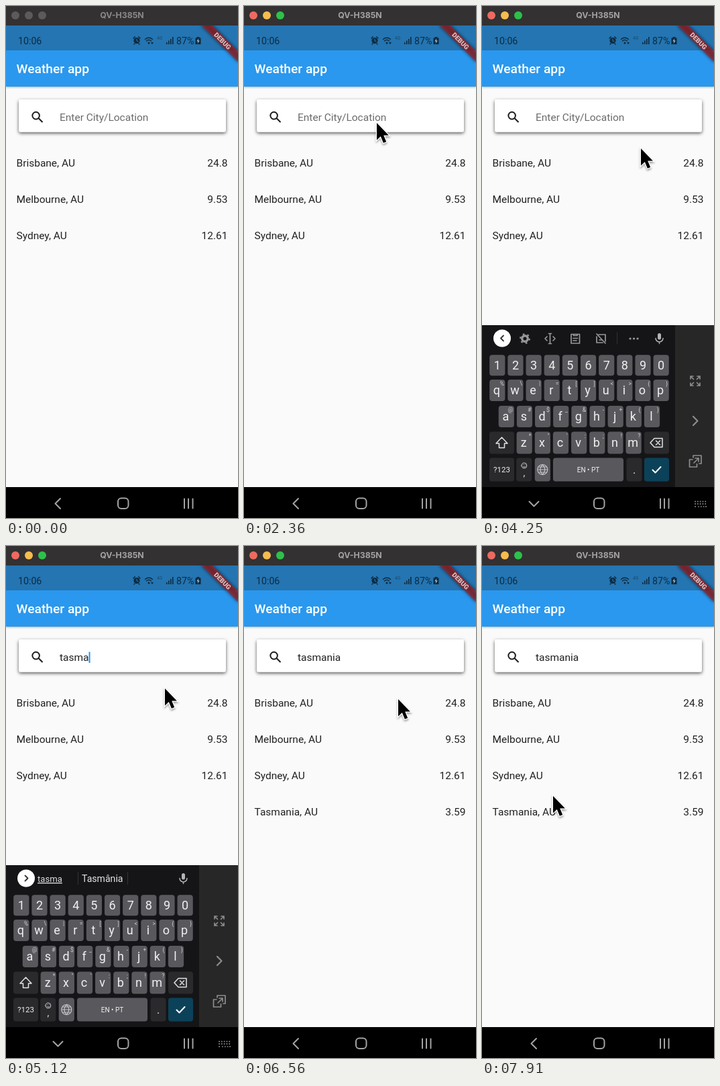
Animation, 346 px wide and 762 px high, one loop 8000 ms. Source, as an HTML page:

```html
<!DOCTYPE html>
<html lang="en">
<head>
<meta charset="utf-8">
<title>Weather app</title>
<style>
  html, body { margin: 0; width: 100%; height: 100%; overflow: hidden; background: #000; }
  svg { display: block; width: 346px; height: 762px; font-family: Roboto, sans-serif; }
  .line { fill: none; stroke-linecap: round; stroke-linejoin: round; }
</style>
</head>
<body>
<svg id="stage" viewBox="0 0 346 762" xmlns="http://www.w3.org/2000/svg">
  <defs>
    <clipPath id="screen"><rect y="29" width="346" height="733"/></clipPath>
    <filter id="soft" x="-30%" y="-100%" width="160%" height="300%"><feGaussianBlur stdDeviation="2.5"/></filter>
    <filter id="card" x="-10%" y="-30%" width="120%" height="170%"><feDropShadow dx="0" dy="2" stdDeviation="2.8" flood-opacity=".65"/></filter>
    <filter id="bar" x="-5%" y="-10%" width="110%" height="130%"><feDropShadow dx="0" dy="1" stdDeviation="1.4" flood-opacity=".3"/></filter>
    <filter id="drop" x="-50%" y="-30%" width="200%" height="170%"><feDropShadow dx="0" dy="2" stdDeviation="1.5" flood-opacity=".4"/></filter>
  </defs>

  <rect y="29" width="346" height="687" fill="#fafafa"/>
  <g id="list" font-size="15.5" fill="#212121"></g>
  <path id="spinner" class="line" style="stroke-linecap:square" stroke="#2196f3" stroke-width="3.8"/>

  <rect x="19" y="139" width="309" height="48.5" rx="3" fill="#fff" filter="url(#card)"/>
  <g class="line" transform="translate(35.5 154) scale(.96)" stroke="#1c1c1c" stroke-width="2.1" style="stroke-linecap:butt">
    <circle cx="9.5" cy="9.5" r="5.5"/><path d="M13.6 13.6L19.8 19.8"/>
  </g>
  <text id="query" x="80" y="171" font-size="15.5"></text>
  <rect id="caret" y="157.5" width="2" height="16.5" fill="#2196f3"/>

  <rect y="60" width="346" height="60" fill="#2b98ee" filter="url(#bar)"/>
  <rect y="29" width="346" height="37" fill="#2475b2"/>
  <text x="15.5" y="100" font-size="19.25" font-weight="500" fill="#fff">Weather app</text>

  <g fill="#0d2b42">
    <text x="18" y="57" font-size="14.2">10:06</text>
    <text x="254" y="57" font-size="14.2">87%</text>
    <text x="225" y="50" font-size="6.5" opacity=".6">4G</text>
    <circle cx="195" cy="51.5" r="4.6"/>
    <path d="M282.5 47.5h2v-1.5h4v1.5h2v9.5h-8z"/>
    <path d="M287.3 48.2l-3 4.4h2.1l-.8 3.6 3.2-4.6h-2.1z" fill="#9cc4e2"/>
    <path d="M239 57v-3h1.6v3zM242 57v-5.5h1.6v5.5zM245 57v-8h1.6v8zM248 57v-11h1.6v11z"/>
    <g class="line" stroke="#0d2b42" stroke-width="1.5">
      <path d="M190 48l2.3-2.3M200 48l-2.3-2.3M192 56l-1 1M198 56l1 1M207.5 49.5q5.5-4.5 11 0M209.5 52q3.5-2.8 7 0"/>
      <path d="M195 49v2.8l2 1" stroke="#2475b2" stroke-width="1.1"/>
    </g>
    <circle cx="213" cy="55" r="1.5"/><path d="M216 54h4l-2 3z"/>
  </g>

  <g clip-path="url(#screen)">
    <g transform="translate(346 29) rotate(45) scale(.96)">
      <rect x="-40" y="28" width="80" height="12" opacity=".6" filter="url(#soft)"/>
      <rect x="-40" y="28" width="80" height="12" fill="#b71c1c" fill-opacity=".6"/>
      <text y="37.6" font-size="10.2" font-weight="900" text-anchor="middle" fill="#fff" opacity=".72">DEBUG</text>
    </g>
  </g>

  <rect y="716" width="346" height="46" fill="#000"/>
  <g id="keyboard">
    <rect y="475" width="346" height="241" fill="#151518"/>
    <rect x="288" y="475" width="58" height="241" fill="#272727"/>
    <g id="keys"></g>
    <circle cx="30" cy="494.5" r="13" fill="#fff"/>
    <path id="toggle" class="line" stroke="#333" stroke-width="1.8"/>
    <g id="tools" class="line" stroke="#98989b" stroke-width="1.7">
      <circle cx="64" cy="495" r="4.3" stroke-width="3.4"/>
      <circle cx="64" cy="495" r="6.8" stroke-width="2.2" stroke-dasharray="2.7 4.42" style="stroke-linecap:butt"/>
      <path d="M101.5 488v14M99.5 487.5h4M99.5 502.5h4M97 492l-3 3 3 3M106 492l3 3-3 3"/>
      <path d="M133 488.5h12.5v13.5h-12.5zM136.5 488.5h5.5v2h-5.5zM136 494.5h6.5M136 498h5"/>
      <path d="M174 489h10v10M171 492v9h9M171 488l13 14M175 497h3"/>
      <path d="M201.5 486v17" stroke="#303033" stroke-width="1"/>
      <path d="M221 495h.1M226.5 495h.1M232 495h.1" stroke-width="3.2"/>
    </g>
    <g id="hints" fill="#e4e4e6">
      <text id="typed" x="47" y="500" font-size="13.1" text-decoration="underline"></text>
      <text id="guess" x="113" y="500" font-size="14.1"></text>
      <path d="M107.5 485v19M181.5 485v19" stroke="#333336"/>
    </g>
    <rect x="262" y="487" width="5" height="9.5" rx="2.5" fill="#b4b4b6"/>
    <path class="line" stroke="#b4b4b6" stroke-width="1.5" d="M259 494.5a5.5 5.5 0 0 0 11 0M264.5 500v2.5"/>
    <g class="line" stroke="#8d8d8f" stroke-width="1.7">
      <path d="M311 555v-4h4M321 551h4v4M325 561v4h-4M315 565h-4v-4M311 551l4.5 4.5M325 551l-4.5 4.5M325 565l-4.5-4.5M311 565l4.5-4.5"/>
      <path d="M315 611l6.5 6.5-6.5 6.5" stroke-width="2.2"/>
      <path d="M314 675h-4.5v11h11v-4.5M315 672v-3h12v12h-3M316 680l7-7M318 673h5v5"/>
    </g>
  </g>

  <g class="line" stroke="#a3a3a3" stroke-width="2">
    <path id="back"/>
    <rect x="167" y="732.5" width="15.5" height="15.5" rx="5"/>
    <path d="M266 733.5v14M272 733.5v14M278.5 733.5v14"/>
    <path id="switch" stroke="#8a8a8a" stroke-width="1.9" stroke-dasharray=".1 3.7" d="M318 737.5h19M318 741h19M318 745h2M334 745h3M323 745.1h8"/>
  </g>

  <rect width="346" height="29" fill="#333132"/>
  <g id="lights"></g>
  <text id="title" x="173" y="18.3" font-family="Inter, sans-serif" font-size="12.3" font-weight="700" text-anchor="middle">QV-H385N</text>

  <path id="pointer" d="M0 0V25.5L5.8 20L9.9 29.7L14.2 27.9L10.2 18.6H17.9Z" fill="#000" stroke="#fff" stroke-width="2.4" paint-order="stroke" filter="url(#drop)"/>
</svg>
<script>
const LOOP = 8000;
const FOCUS = 1180, OPEN = 3650, SEARCH = 5980, RESULT = 6460;
const WORD = 'tasmania';
const STROKES = [4530, 4720, 4820, 5010, 5110, 5310, 5510, 5700];
const PATH = [
  [800, 324, 498], [1580, 225, 312], [1680, 221, 300], [1870, 206, 242], [2070, 206, 242],
  [2360, 198, 174], [3180, 198, 174], [3360, 161, 170], [3650, 161, 170], [3750, 168, 184],
  [4250, 237, 212], [6370, 237, 212], [6560, 230, 228], [7150, 158, 378], [7250, 152, 384], [7910, 106, 372]
];
const CITIES = [['Brisbane, AU', '24.8'], ['Melbourne, AU', '9.53'], ['Sydney, AU', '12.61'], ['Tasmania, AU', '3.59']];

const $ = id => document.getElementById(id);
const clamp = v => Math.max(0, Math.min(1, v));
const show = (el, on) => el.setAttribute('visibility', on ? 'inherit' : 'hidden');

function add(parent, tag, attrs, text) {
  const el = document.createElementNS('http://www.w3.org/2000/svg', tag);
  for (const k in attrs) el.setAttribute(k, attrs[k]);
  if (text) el.textContent = text;
  return parent.appendChild(el);
}

const rows = CITIES.map(([name, temp], i) => {
  const row = add($('list'), 'g', {});
  const y = 239 + 54 * i;
  add(row, 'text', { x: 15.5, y }, name);
  add(row, 'text', { x: 330.5, y, 'text-anchor': 'end' }, temp);
  return row;
});

const lights = [14, 34, 54].map(cx => add($('lights'), 'circle', { cx, cy: 14, r: 6 }));

// Keyboard
const keys = $('keys');
const KEY = '#59595d', DARK = '#2a2a2d';
function key(x, y, w, h, label, size = 18, fill = KEY, mark = '') {
  add(keys, 'rect', { x: x - w / 2, y: y - h / 2, width: w, height: h, rx: 4, fill });
  if (label) add(keys, 'text', { x: x - (mark ? 1 : 0), y: y + size * .35, 'font-size': size, fill: '#f0f0f0', 'text-anchor': 'middle' }, label);
  if (mark) add(keys, 'text', { x: x + w / 2 - 1.5, y: y - 7.5, 'font-size': 8.5, fill: '#d0d0d2', 'text-anchor': 'end' }, mark);
}
[
  ['1234567890', '', 22.8, 534.7, 31],
  ['qwertyuiop', '%\\|=[]<>{}', 22.8, 572, 32],
  ['asdfghjkl', '@#$_&-+()', 36.3, 611, 32],
  ['zxcvbnm', '*"\':;!?', 63.2, 650, 33]
].forEach(([chars, marks, x, y, h]) =>
  [...chars].forEach((c, i) => key(x + 27.15 * i, y, 23.2, h, c, 18, KEY, marks[i])));
key(29.5, 650, 37, 33, '', 0, DARK);
key(260.5, 650, 37, 33, '', 0, DARK);
key(29.5, 690, 37, 35, '?123', 11.5, DARK);
key(62.8, 690, 23.2, 35, '', 0, DARK);
key(90.3, 690, 23.2, 35);
key(158.5, 690, 105, 35, 'EN • PT', 10);
key(227, 690, 23, 35, '.', 16, DARK);
key(260.5, 690, 37, 35, '', 0, '#0c4259');
const icon = (d, stroke = '#e2e2e4', w = 1.5) => add(keys, 'path', { class: 'line', d, stroke, 'stroke-width': w });
icon('M29.5 642l-8.5 9h4.5v6.5h8v-6.5h4.5z');
icon('M257 643.5h12v13h-12l-6-6.5zM259.5 647l6 6M265.5 647l-6 6');
icon('M254.5 690.5l4 4 8-8.5', '#fff', 2);
icon('M82.8 690a7.5 7.5 0 0 1 15 0a7.5 7.5 0 0 1-15 0h15M83.8 686h13M83.8 694h13M90.3 682.5q-7 7.5 0 15q7-7.5 0-15', '#c4c4c6', 1.2);
icon('M58.8 684a4 4 0 0 1 8 0a4 4 0 0 1-8 0M61 685.5q1.8 2 3.6 0M61.5 682.7h.1M64 682.7h.1', '#d0d0d2', 1);
add(keys, 'text', { x: 62.8, y: 700, 'font-size': 14, fill: '#e2e2e4', 'text-anchor': 'middle' }, ',');

// Cubic timing curve (.4, 0, .2, 1)
function fastOutSlowIn(x) {
  if (x <= 0 || x >= 1) return clamp(x);
  let lo = 0, hi = 1, u = .5;
  for (let i = 0; i < 16; i++) {
    u = (lo + hi) / 2;
    const bx = 1.2 * u * (1 - u) ** 2 + .6 * u * u * (1 - u) + u ** 3;
    if (bx < x) lo = u; else hi = u;
  }
  return 3 * u * u * (1 - u) + u ** 3;
}

function pointerAt(t) {
  let i = 0;
  while (i < PATH.length - 2 && t > PATH[i + 1][0]) i++;
  const [t0, x0, y0] = PATH[i], [t1, x1, y1] = PATH[i + 1];
  const p = clamp((t - t0) / (t1 - t0)), e = p * p * (3 - 2 * p);
  return [x0 + (x1 - x0) * e, y0 + (y1 - y0) * e];
}

// 0 when hidden, 1 when fully open
function keyboardAt(t) {
  if (t < OPEN) return 0;
  if (t < SEARCH) return 1 - (1 - clamp((t - OPEN) / 354)) ** 2;
  return 1 - fastOutSlowIn(clamp((t - SEARCH) / 280));
}

function drawSpinner(ms, cy) {
  const r = 17, cycle = ms / 1333 % 1;
  const head = fastOutSlowIn(clamp(cycle * 2)), tail = fastOutSlowIn(clamp(cycle * 2 - 1));
  const a = Math.PI * (-.5 + 1.5 * tail + ms / 2222 * 2 + cycle * .5);
  const sweep = Math.max(1.5 * Math.PI * (head - tail), .002);
  const at = v => (173 + r * Math.cos(v)).toFixed(3) + ' ' + (cy + r * Math.sin(v)).toFixed(3);
  $('spinner').setAttribute('d', `M${at(a)}A${r} ${r} 0 ${sweep > Math.PI ? 1 : 0} 1 ${at(a + sweep)}`);
}

function draw(t) {
  const focused = t >= FOCUS;
  const colors = focused ? ['#ee6a5f', '#f5bd4f', '#2fc04a'] : ['#5c5a5b', '#5c5a5b', '#5c5a5b'];
  lights.forEach((c, i) => c.setAttribute('fill', colors[i]));
  $('title').setAttribute('fill', focused ? '#a5a3a4' : '#8b898a');

  const count = STROKES.filter(s => t >= s).length;
  const typed = WORD.slice(0, count);
  const query = $('query');
  query.textContent = typed || 'Enter City/Location';
  query.setAttribute('fill', typed ? '#212121' : '#6b6b6b');

  const since = t - (count ? STROKES[count - 1] : OPEN);
  show($('caret'), t >= OPEN && t < SEARCH && since % 1000 < 500);
  $('caret').setAttribute('x', 80 + (typed ? query.getComputedTextLength() : 0));

  const open = keyboardAt(t);
  show($('keyboard'), open > 0);
  $('keyboard').setAttribute('transform', `translate(0 ${(241 * (1 - open)).toFixed(2)})`);
  $('toggle').setAttribute('d', count ? 'M28.5 490.5l4 4-4 4' : 'M32 490.5l-4 4 4 4');
  show($('tools'), !count);
  show($('hints'), count);
  $('typed').textContent = typed;
  $('guess').textContent = count < 5 ? typed.charAt(0).toUpperCase() + typed.slice(1) : 'Tasmânia';

  const ime = t >= OPEN && t < SEARCH;
  $('back').setAttribute('d', ime ? 'M70.5 737.5l7 7 7-7' : 'M81 733l-7.5 7.5 7.5 7.5');
  show($('switch'), ime);

  const loading = t >= SEARCH && t < RESULT;
  show($('list'), !loading);
  show(rows[3], !loading && t >= RESULT);
  show($('spinner'), loading);
  if (loading) drawSpinner(t - SEARCH, 340 + 120 * (1 - open));

  const [x, y] = pointerAt(t);
  show($('pointer'), t >= PATH[0][0]);
  $('pointer').setAttribute('transform', `translate(${x.toFixed(2)} ${y.toFixed(2)})`);
}

const start = performance.now();
function tick() {
  draw((performance.now() - start) % LOOP);
  requestAnimationFrame(tick);
}
tick();
</script>
</body>
</html>
```
